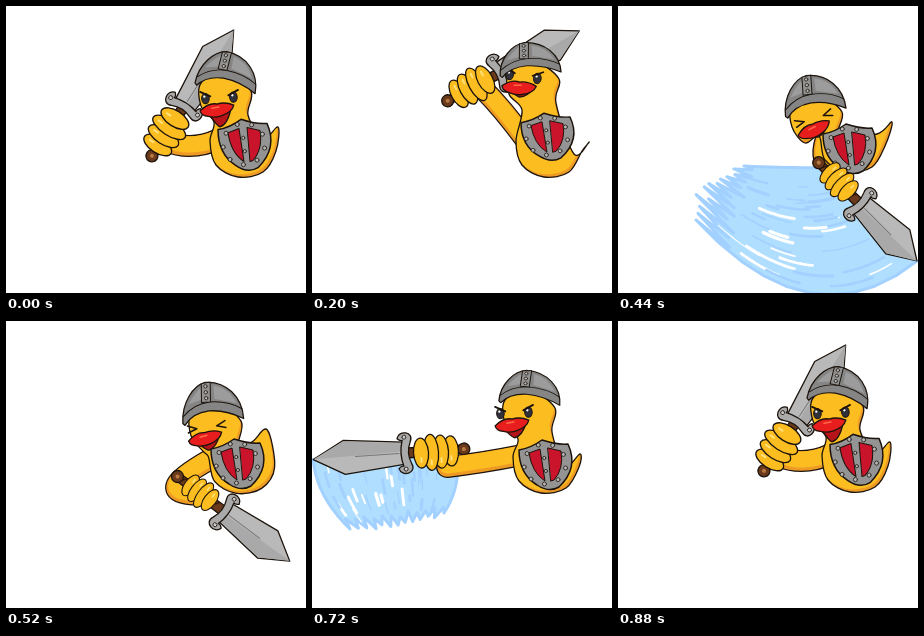
Recreate the animation shown at these times as an HTML page with a canvas. Size 300x287 px, loop 1160 ms.

```html
<!DOCTYPE html>
<html>
<head>
<meta charset="utf-8">
<style>
html, body { margin: 0; height: 100%; overflow: hidden; background: #fff; }
canvas { display: block; }
</style>
</head>
<body>
<canvas id="stage" width="300" height="287"></canvas>
<script>
const ctx = document.getElementById('stage').getContext('2d');
const LOOP = 1160, INK = '#1c140c', YELLOW = '#fcbd20', ORANGE = '#ee9b25';

// head, belly, tail: key points; arm: elbow and hand
// face: x, y, degrees, mouth opening; helmet: x, y, degrees, height
// shield: x, y, height; sword: guard x, y, degrees, length, fist scale
// wake: far outer and inner ends of the splash, then their bend points
const ready = {
  head: [219, 95], belly: [237, 143], tail: [272, 121], arm: [185, 146, 160, 135],
  face: [211, 103, -3, 18], helmet: [219, 80, 11, .92], shield: [238, 138, 1.03],
  sword: [177, 102, -57, 93, 1.05], wake: [40, 40, 130, 90, 60, -20, 145, 110]
};
const windup = {
  head: [221, 83], belly: [237, 143], tail: [277, 136], arm: [190, 102, 172, 84],
  face: [207, 81, 8, 10], helmet: [218, 66, -3, .8], shield: [235, 130, .95],
  sword: [186, 68, -28, 92, 1]
};
const chop = {
  head: [198, 116], belly: [234, 138], tail: [274, 116], arm: [192, 186, 146, 176],
  face: [196, 123, -18, 9], helmet: [197, 104, -7, .95], shield: [231, 142, 1],
  sword: [134, 177, -209, 74, .5], wake: [76, 24, 170, 146, -2, 115, 150, 135], shut: true
};
const sweep = {
  ...chop, arm: [200, 150, 212, 163], sword: [241, 197, -315, 82, .85],
  wake: [78, 214, 126, 160, 194, 339, 170, 162], front: true
};
const recover = {
  head: [212, 109], belly: [236, 146], tail: [258, 107], arm: [130, 176, 180, 176],
  face: [200, 115, -6, 14], helmet: [209, 96, -3, 1], shield: [231, 142, 1],
  sword: [211, 188, -325, 84, .8], wake: [290, 262, 262, 232, 290, 330, 220, 235],
  shut: true, front: true
};
const upswing = {
  head: [217, 97], belly: [234, 144], tail: [268, 133], arm: [170, 142, 135, 146],
  face: [200, 103, -3, 14], helmet: [217, 80, 5, .82], shield: [233, 143, 1],
  sword: [95, 132, -184, 94, 1], wake: [38, 208, 132, 192, 4, 175, 150, 165]
};

// start time, from, to, mix, splash
const steps = [
  [0, ready, ready, 0], [80, ready, windup, .4], [120, ready, windup, .8],
  [200, windup, windup, 0], [280, windup, chop, .2],
  [360, chop, chop, 0, true], [400, chop, sweep, .48, true],
  [440, sweep, sweep, 0, true], [480, sweep, recover, .4, true],
  [520, sweep, recover, .8], [600, recover, recover, 0],
  [680, recover, upswing, .42, true], [720, upswing, upswing, 0, true],
  [760, upswing, ready, .35, true], [800, upswing, ready, .7, true],
  [840, upswing, ready, .9], [880, ready, ready, 0]
];

const mix = (a, b, k) => a.map((v, i) => v + (b[i] - v) * k);

function blend(a, b, k) {
  const pose = { ...(k < .5 ? a : b) };
  for (const key in a)
    if (Array.isArray(a[key]) && b[key]) pose[key] = mix(a[key], b[key], k);
  return pose;
}

function seeded(seed) {
  return () => (seed = seed * 16807 % 2147483647) / 2147483647;
}

function paint(path, fill, line = INK, width = 1.3) {
  if (fill) { ctx.fillStyle = fill; ctx.fill(path); }
  if (line) { ctx.strokeStyle = line; ctx.lineWidth = width; ctx.stroke(path); }
}
const draw = (d, ...style) => paint(new Path2D(d), ...style);

function oval(x, y, rx, ry, ...style) {
  const p = new Path2D();
  p.ellipse(x, y, rx, ry, 0, 0, Math.PI * 2);
  paint(p, ...style);
}

// closed curve through all points
function blob(pts) {
  const n = pts.length, p = new Path2D();
  p.moveTo(...pts[0]);
  for (let i = 0; i < n; i++) {
    const [a, b, c, d] = [n - 1, 0, 1, 2].map(k => pts[(i + k) % n]);
    p.bezierCurveTo(b[0] + (c[0] - a[0]) / 6, b[1] + (c[1] - a[1]) / 6,
      c[0] - (d[0] - b[0]) / 6, c[1] - (d[1] - b[1]) / 6, ...c);
  }
  return p;
}

function placed([x, y, deg], scaleY, fn) {
  ctx.save();
  ctx.translate(x, y);
  ctx.rotate(deg * Math.PI / 180);
  ctx.scale(1, scaleY);
  fn();
  ctx.restore();
}

// strands bend from the sword (t = 0) to the torn far edge (t = 1)
function drawWake({ wake, sword: [x, y, deg, len] }) {
  const rnd = seeded(77), angle = deg * Math.PI / 180, teeth = 24;
  const along = d => [x + Math.cos(angle) * d, y + Math.sin(angle) * d];
  const pair = i => wake.slice(i, i + 2);
  const point = (s, t) => {
    const start = mix(along(len), along(-50), s);
    const end = mix(pair(0), pair(2), s), bend = mix(pair(4), pair(6), s);
    return mix(mix(start, bend, t), mix(bend, end, t), t);
  };
  const strand = (s, from, to, path = new Path2D()) => {
    for (let i = 0; i <= 10; i++) path.lineTo(...point(s, from + (to - from) * i / 10));
    return path;
  };
  const edge = strand(0, 0, 1);
  for (let i = 1; i < teeth; i++)
    edge.lineTo(...point(i / teeth, i % 2 ? .86 + rnd() * .08 : 1 + rnd() * .07));
  strand(1, 1, 0, edge);
  edge.closePath();
  paint(edge, '#b0deff', '#a2d0ff', 3);
  for (let i = 0; i < 36; i++) {
    const s = .06 + rnd() * .8, t = .08 + rnd() * .65, size = .08 + rnd() * .2;
    paint(strand(s, t, t + size), null, i % 3 ? '#a2d0ff' : '#fff', 1 + rnd() * 2.5);
  }
}

function drawSword([x, y, deg, len]) {
  placed([x, y, deg], 1, () => {
    const shoulder = len * .67;
    draw(`M2 -11L${shoulder} -17L${len} 0L${shoulder} 17L2 11Z`, '#b9b9b9');
    draw(`M4 2L${len} 0L${shoulder} 16L3 10Z`, '#a9a9a9', null);
    draw(`M8 0L${len * .55} 0`, null, '#777', 1);
    draw('M0 -5L-55 -4L-55 4L0 5Z', '#6b3a1c');
    for (let u = -8; u > -50; u -= 10) draw(`M${u} -4l-6 8`, null, '#351b0c', 1.5);
    oval(-57, 0, 6, 6, '#6b3a1c');
    oval(-57, 0, 2, 2, '#b87942', null);
    draw('M-4 -11Q1 0 -4 11C-9 21 7 24 9 15Q6 12 4 13Q8 0 4 -13Q6 -12 9 -15C7 -24 -9 -21 -4 -11Z', '#aaa');
    for (const v of [-16, 16]) oval(2, v, 2, 2, '#ccc', INK, .8);
  });
}

function drawFist([x, y, deg, , size]) {
  placed([x, y, deg], 1, () => {
    ctx.translate(-29, 0);
    ctx.scale(size, size);
    for (let i = 0; i < 4; i++) {
      const u = -15 + i * 10, r = 15 + i % 3 * 1.5;
      oval(u, -1, 7.5, r, YELLOW);
      draw(`M${u} ${5 - r}v4`, null, '#ffe07a', 2);
    }
  });
}

function drawArm({ arm: [ex, ey, hx, hy], belly: [x, y] }) {
  const d = `M${x - 24} ${y - 10}Q${ex} ${ey} ${hx} ${hy}`;
  draw(d, null, INK, 22);
  draw(d, null, ORANGE, 19.5);
  ctx.save();
  ctx.translate(0, -1.5);
  draw(d, null, YELLOW, 16);
  ctx.restore();
}

function drawBody({ head: [hx, hy], belly: [bx, by], tail: [tx, ty] }) {
  const shape = blob([
    [hx, hy - 28], [hx - 24, hy - 18], [hx - 24, hy + 5], [hx - 11, hy + 21],
    [bx - 33, by - 8], [bx - 27, by + 16], [bx - 5, by + 28], [bx + 20, by + 23],
    [bx + 33, by + 2], [tx, ty], [tx - 15, ty + 12], [hx + 23, hy + 14], [hx + 26, hy - 10]
  ]);
  paint(shape, ORANGE, null);
  ctx.save();
  ctx.clip(shape);
  ctx.translate(-2, -3);
  paint(shape, YELLOW, null);
  ctx.restore();
  paint(shape);
}

function drawFace({ face, shut }) {
  placed(face, 1, () => {
    const open = face[3];
    for (const [u, side] of [[-11, 1], [17, -1]]) {
      if (shut) {
        draw(`M${u - side * 5} -14L${u + side * 4} -10L${u - side * 5} -7`, null, INK, 1.5);
      } else {
        oval(u, -11, 3.8, 5.2, '#30303a', INK, 1);
        oval(u - 1, -13, 1.2, 1.2, '#fff', null);
        draw(`M${u - side * 5} -18L${u + side * 5} -13`, null, INK, 1.8);
      }
    }
    draw(`M-8 5Q0 ${open} 2 ${open}Q10 ${open - 2} 14 0Z`, '#b5141a');
    draw('M-17 1Q-8 -7 0 -5Q9 -7 17 -3Q15 4 4 7Q-3 9 -9 7Q-16 6 -17 1Z', '#e81d1d');
    draw('M-5 -1L2 -2', null, '#ff6a4a', 1.5);
  });
}

function drawHelmet(helmet) {
  placed(helmet, helmet[3], () => {
    draw('M-30 3C-30 -18 -17 -35 -5 -37C16 -37 31 -20 31 2Q14 -8 -3 -8Q-20 -7 -28 5Z', '#858585');
    draw('M-23 -16Q-15 -29 -8 -33V-20ZM3 -33Q18 -30 25 -14L3 -20Z', '#9c9c9c', null);
    draw('M-29 -4Q-18 -16 -2 -17Q17 -17 30 -8', null, INK, 1);
    draw('M-9 -36L0 -37L-1 -17L-10 -17Z', '#929292', INK, 1);
    for (let v = -33; v < -20; v += 6) oval(-5, v, 1.7, 1.7, '#bbb', INK, .8);
  });
}

function drawShield([x, y, scale]) {
  placed([x, y, 0], scale, () => {
    draw('M-26 -14Q-14 -16 -3 -24Q12 -19 23 -20Q34 4 14 23Q4 29 -8 21Q-26 10 -26 -14Z', '#949494', INK, 1.5);
    draw('M-16 -11L-5 -15L0 17Q-13 9 -16 -11ZM3 -16L16 -13Q19 5 9 16L6 17Z', '#c9142b', INK, 1);
    for (let i = 0; i < 9; i++) {
      const a = i * Math.PI / 4.5 + .2;
      oval(Math.cos(a) * 21, Math.sin(a) * 20, 2, 2, '#b8b8b8', INK, .8);
    }
    for (const v of [-6, 7]) oval(v / 8, v, 1.6, 1.6, '#b8b8b8', INK, .8);
  });
}

function drawDuck(pose) {
  drawArm(pose);
  drawBody(pose);
  drawFace(pose);
  drawHelmet(pose.helmet);
  drawShield(pose.shield);
}

function frame() {
  const t = performance.now() % LOOP;
  const [, from, to, k, splash] = steps.findLast(s => s[0] <= t);
  const pose = blend(from, to, k);
  ctx.clearRect(0, 0, 300, 287);
  ctx.lineJoin = ctx.lineCap = 'round';
  if (pose.front) drawDuck(pose);
  if (splash) drawWake(pose);
  drawSword(pose.sword);
  if (!pose.front) drawDuck(pose);
  drawFist(pose.sword);
  requestAnimationFrame(frame);
}
frame();
</script>
</body>
</html>
```
